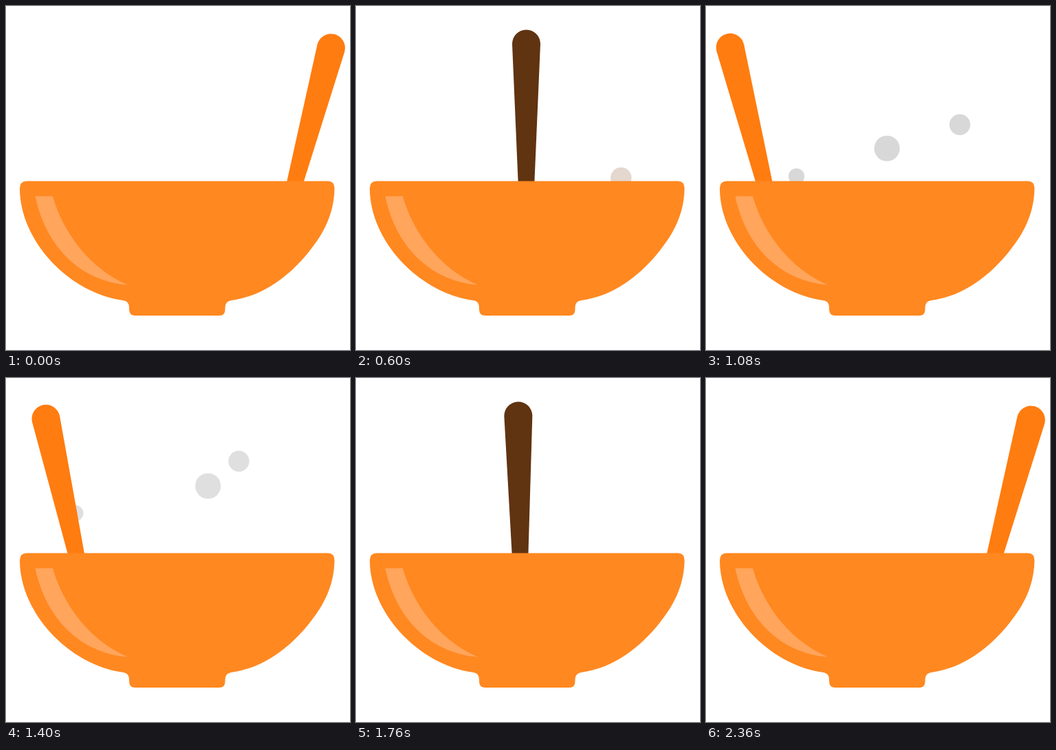
An HTML page that plays this animation: 500 by 500 pixels, repeating every 2400 ms.

```html
<!DOCTYPE html>
<html lang="en">
<head>
<meta charset="utf-8">
<title>Bowl and spoon</title>
<style>
html, body { margin: 0; width: 100%; height: 100%; overflow: hidden; background: #fff; }
svg { display: block; width: 100vw; height: 100vh; }
</style>
</head>
<body>
<svg viewBox="0 0 500 500">
  <g id="steam">
    <circle r="15.2"/>
    <circle r="18.6"/>
    <circle r="11.6"/>
  </g>
  <path id="spoon" d="M-20.5 -173.5A20.5 20.5 0 0 1 20.5 -173.5L10 71H-10Z"/>
  <path fill="#ff8820" d="M30 254.5H468Q477.5 254.5 477.5 265C477 300 463 329 442 355C414 391 374 422 327 428Q318.5 429.5 318.5 438V441Q318.5 450 310 450H188Q179 450 179 441V438Q179 429.5 171 428C90 417 20 340 20 265Q20 254.5 30 254.5Z"/>
  <path fill="#ffa55c" d="M42.5 276.5H68C82 327 120 381 177 405.5C108 400 58 350 42.5 276.5Z"/>
</svg>
<script>
const LOOP = 2400, STEP = 40, TURN = 30, END = 59;
const spoon = document.getElementById('spoon');
const steam = document.getElementById('steam');

// Centre of sway, sway width, height at step 27, rise per step
const puffs = [
  { x: 339, sway: 47, y: 172.5, rise: 6.44 },
  { x: 293, sway: -47, y: 207, rise: 6.25 },
  { x: 101.5, sway: 47, y: 247.5, rise: 6.38 }
];

const clamp = v => Math.min(1, Math.max(0, v));
const ease = v => v * v * (3 - 2 * v);

function draw(ms) {
  const k = Math.floor((ms % LOOP) / STEP);

  const swing = k < TURN
    ? 1 - 2 * ease(k / TURN)
    : 2 * ease((k - TURN) / (END - TURN)) - 1;
  const dark = Math.abs(swing) < 0.75;
  spoon.setAttribute('transform', `translate(${247.5 + 180 * swing} 228.5) rotate(${15 * swing})`);
  spoon.setAttribute('fill', dark ? '#603311' : '#ff7c10');

  const wave = Math.cos(0.088 * (k - 17));
  puffs.forEach((p, i) => {
    const c = steam.children[i];
    c.setAttribute('cx', p.x + p.sway * wave);
    c.setAttribute('cy', p.y - p.rise * (k - 27));
  });
  steam.setAttribute('fill', dark ? '#e4d7ce' : '#d8d8d8');
  steam.setAttribute('opacity', k < 11 ? 0 : 1 - clamp((k - 33) / 10));
}

const start = performance.now();
function tick() {
  draw(performance.now() - start);
  requestAnimationFrame(tick);
}
tick();
</script>
</body>
</html>
```
